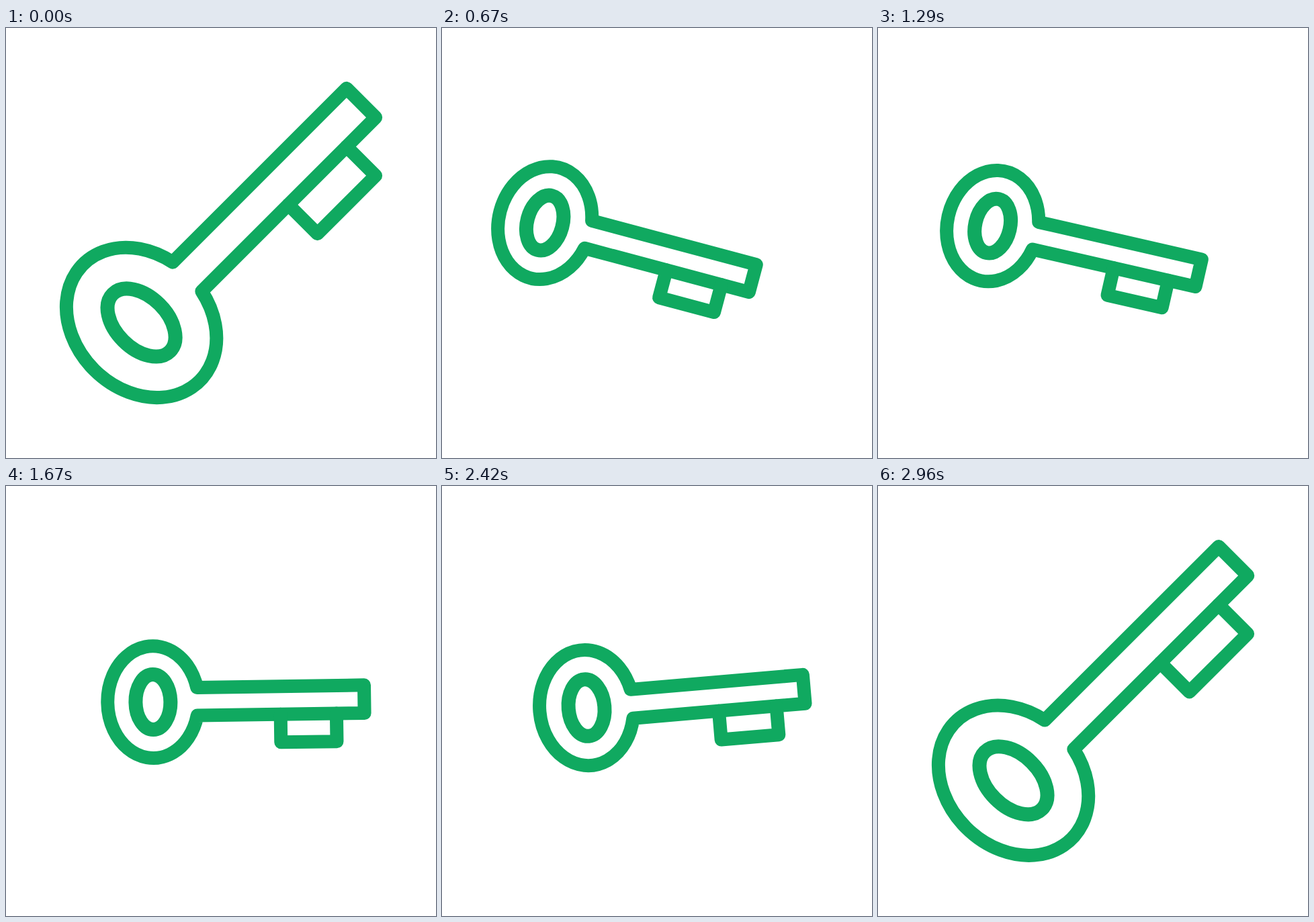
Write an HTML page that moves like this. It is 640 px wide and 640 px high and loops after 3000 ms.

```html
<!DOCTYPE html>
<html lang="en">
<head>
<meta charset="utf-8">
<title>Turning key</title>
<style>
  html, body { margin: 0; width: 100%; height: 100%; overflow: hidden; background: #fff; }
  svg { display: block; width: 100vw; height: 100vh; }

  .key {
    fill: none;
    stroke: #10a960;
    stroke-width: 20;
    stroke-linejoin: round;
    stroke-linecap: round;
    transform-origin: 0 0;
    animation: slide 3s infinite, turn 3s infinite, size 3s infinite;
    animation-play-state: paused;
  }
  .key * { vector-effect: non-scaling-stroke; }
  .hole { stroke-width: 21; }

  /* pull back, push in, rest, swing home */
  @keyframes slide {
    0% { translate: 320px 320px; animation-timing-function: linear; }
    1.389% { translate: 320px 320px; animation-timing-function: cubic-bezier(.17, 0, .2, 1); }
    29.167% { translate: 263px 320px; animation-timing-function: cubic-bezier(.86, 0, .15, 1); }
    59.722% { translate: 333.5px 320px; animation-timing-function: linear; }
    72.222% { translate: 333.5px 320px; animation-timing-function: cubic-bezier(.76, 0, .18, 1); }
    100% { translate: 320px 320px; }
  }
  @keyframes turn {
    0% { rotate: -45deg; animation-timing-function: linear; }
    1.389% { rotate: -45deg; animation-timing-function: cubic-bezier(.17, 0, .2, 1); }
    29.167% { rotate: 17.3deg; animation-timing-function: cubic-bezier(.88, 0, .15, 1); }
    59.722% { rotate: -1deg; animation-timing-function: linear; }
    72.222% { rotate: -1deg; animation-timing-function: cubic-bezier(.76, 0, .18, 1); }
    100% { rotate: -45deg; }
  }
  @keyframes size {
    0% { scale: 1; animation-timing-function: linear; }
    1.389% { scale: 1; animation-timing-function: cubic-bezier(.17, 0, .2, 1); }
    29.167% { scale: .68; animation-timing-function: linear; }
    72.222% { scale: .68; animation-timing-function: cubic-bezier(.83, 0, .19, 1); }
    100% { scale: 1; }
  }
</style>
</head>
<body>
<svg viewBox="0 0 640 640">
  <g class="key">
    <path d="M-71.1 -30.6H294.9V30.6H-71.1A99.5 122.7 0 1 1 -71.1 -30.6Z"/>
    <path d="M111.2 30.6V91.8H233.6V30.6"/>
    <ellipse class="hole" cx="-167.5" rx="38.2" ry="60.3"/>
  </g>
</svg>
<script>
  // Step the paused keyframes at 24 pictures per second.
  const FPS = 24, LOOP = 3000;
  const tracks = document.getAnimations();

  function draw() {
    const time = performance.now() % LOOP;
    const step = Math.floor((time + 4) * FPS / 1000) % (LOOP * FPS / 1000);
    for (const track of tracks) track.currentTime = step * 1000 / FPS;
    requestAnimationFrame(draw);
  }
  draw();
</script>
</body>
</html>
```
